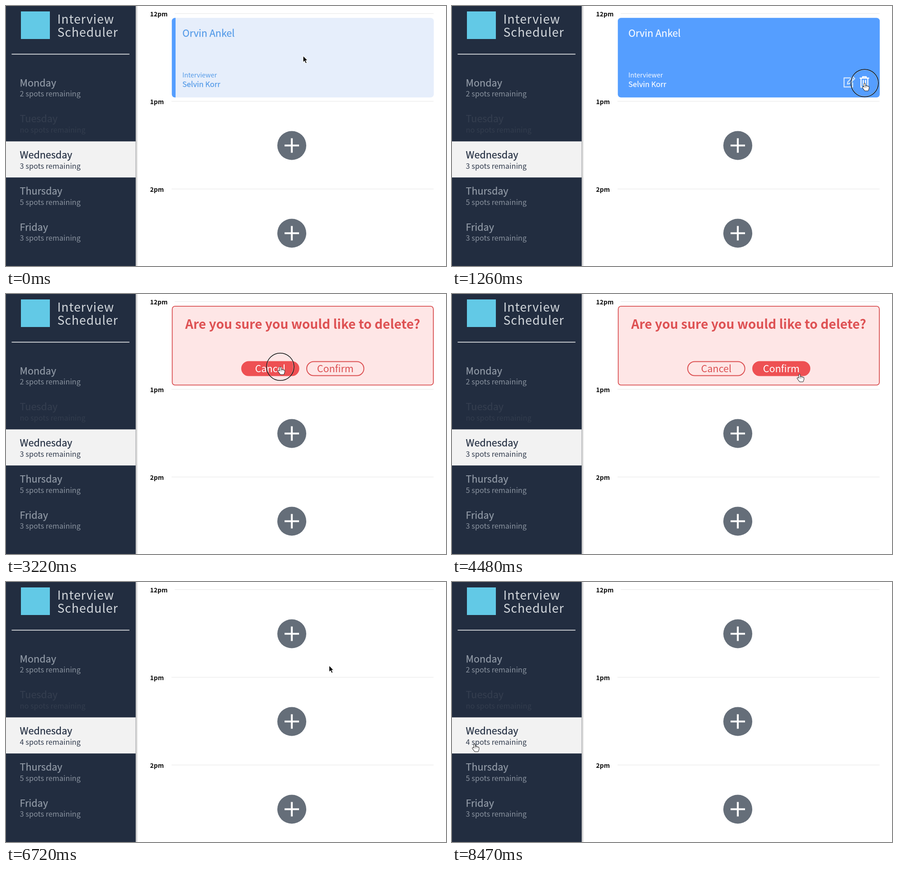
Recreate the animation shown at these times as an HTML page. Size 973 px wide and 575 px high, loop 8.54 s.

```html
<!DOCTYPE html>
<html lang="en">
<head>
<meta charset="utf-8">
<title>Interview Scheduler</title>
<style>
  html, body { margin: 0; width: 100%; height: 100%; overflow: hidden; background: #fff; }
  svg { display: block; width: 100vw; height: 100vh; }
  text { font-family: "Noto Sans CJK JP", "Noto Sans CJK SC", "Noto Sans", sans-serif; font-size: 21.5px; fill: currentColor; }
  .medium { stroke: currentColor; stroke-width: .25; }
  .logo { font-size: 26.6px; font-weight: 300; letter-spacing: 1px; color: #d3d8dd; }
  .spots { font-size: 16.25px; font-weight: 300; opacity: .92; }
  .hour { font-size: 13.9px; font-weight: 700; color: #0b0b0b; }
  .label { font-size: 14.3px; font-weight: 300; }
  .person { font-size: 16.5px; }
  .headline { font-size: 28.1px; font-weight: 700; }
  .mid { text-anchor: middle; }
  .rule { stroke: #ebebeb; stroke-width: 1.3; }
  .open { color: #929ba7; }
  .full { color: #343e4f; }
  .current { color: #222d40; }
  .icon { fill: none; stroke: #fff; stroke-width: 2.4; stroke-linejoin: round; stroke-linecap: round; }
  .pill { fill: none; stroke: #dc5153; stroke-width: 2; color: #dc5153; }
  .pill text { stroke: none; fill: currentColor; }
  .pill.hot { fill: #ee5053; stroke: #ee5053; color: #fff; }
  .hand { stroke-linecap: round; stroke-linejoin: round; }
</style>
</head>
<body>
<svg viewBox="0 0 973 575" preserveAspectRatio="none">
  <defs>
    <linearGradient id="shade">
      <stop offset="0" stop-color="#000" stop-opacity=".3"/>
      <stop offset="1" stop-color="#000" stop-opacity="0"/>
    </linearGradient>
    <g id="add">
      <circle r="32" fill="#656e79"/>
      <path d="M-16 0H16M0 -16V16" stroke="#fff" stroke-width="4.2"/>
    </g>
    <rect id="card" x="366.7" y="26.3" width="579.2" height="176" rx="7"/>
    <clipPath id="cardEdge"><use href="#card"/></clipPath>
    <g id="booking">
      <text class="medium" x="390" y="68">Orvin Ankel</text>
      <text class="label" x="390" y="158">Interviewer</text>
      <text class="person medium" x="390" y="179">Selvin Korr</text>
    </g>
    <path id="fingers" d="M0 2V10M3 7V12M5.7 7.7V12M8.2 8.7V12M-3.5 9.5L1 15.5H7L8.2 11"/>
  </defs>

  <rect x="286" width="6" height="575" fill="url(#shade)"/>
  <rect width="286.7" height="575" fill="#222d40"/>
  <rect x="33" y="12" width="64" height="61" fill="#62c9e6"/>
  <text class="logo" x="113.5" y="39.3">Interview</text>
  <text class="logo" x="113.5" y="68.3">Scheduler</text>
  <path d="M12.5 106.5H273" stroke="#fff" stroke-width="1.7"/>
  <rect y="299.4" width="286.7" height="79.8" fill="#f2f2f2"/>
  <g id="days"></g>
  <g id="hours"></g>

  <g id="empty"><use href="#add" x="632" y="114.5"/></g>

  <g id="idle" color="#559be8">
    <use href="#card" fill="#e6eefb"/>
    <rect x="366" y="26" width="9" height="177" fill="#559eff" clip-path="url(#cardEdge)"/>
    <use href="#booking"/>
  </g>

  <g id="hover" color="#f7faff">
    <use href="#card" fill="#559eff"/>
    <use href="#booking"/>
    <g class="icon" opacity=".72">
      <path d="M880 159H867V179H886V170"/>
      <path d="M874.5 172.5L875.5 167.5L886.5 156.5L890.5 160.5L879.5 171.5ZM883.5 159.5L887.5 163.5"/>
    </g>
    <path id="trash" class="icon" d="M902.5 159.5H921.5M908 159V156.5H916V159M904.5 160V179.5H919.5V160M909.5 164.5V175M914.5 164.5V175"/>
  </g>

  <g id="confirming">
    <rect x="367.6" y="27.2" width="577.4" height="174.2" rx="6" fill="#fee6e6" stroke="#d95052" stroke-width="1.8"/>
    <text class="headline mid" x="656" y="77" color="#de5153">Are you sure you would like to delete?</text>
    <g id="cancel" class="pill mid" transform="translate(584.4 165)">
      <rect x="-63.2" y="-15.5" width="126.4" height="31" rx="15.5"/>
      <text y="8.3">Cancel</text>
    </g>
    <g id="confirm" class="pill mid" transform="translate(728.2 165)">
      <rect x="-63.2" y="-15.5" width="126.4" height="31" rx="15.5"/>
      <text y="8.3">Confirm</text>
    </g>
  </g>

  <g id="deleting">
    <use href="#card" fill="#222d40"/>
    <g transform="translate(583 114.5)" fill="none" stroke="#fff" stroke-width="4">
      <circle r="22.4" stroke-opacity=".17"/>
      <circle id="spinner" r="22.4" pathLength="360" stroke-dasharray="96 264"/>
    </g>
    <text class="headline mid" x="696.7" y="125.3" color="#fff">Deleting</text>
  </g>

  <g id="cursor">
    <g id="ring" fill="none">
      <circle r="29.4" stroke="#fff" stroke-opacity=".6"/>
      <circle r="30.3" stroke="#111" stroke-width="1.5"/>
    </g>
    <path id="arrow" d="M0 0V14.6L3.3 11.6L5.6 17L8.3 15.8L6 10.6H10.3Z" stroke="#fff" stroke-width="1.1"/>
    <g id="hand" class="hand">
      <use href="#fingers" fill="#222" stroke="#222" stroke-width="4.3"/>
      <use href="#fingers" fill="#fff" stroke="#fff" stroke-width="2.3"/>
    </g>
  </g>
</svg>
<script>
const LOOP = 8540;
const $ = id => document.getElementById(id);
const show = (id, on) => $(id).style.display = on ? "" : "none";

const days = [
  ["Monday", "2", "open"],
  ["Tuesday", "no", "full"],
  ["Wednesday", "3", "current"],
  ["Thursday", "5", "open"],
  ["Friday", "3", "open"],
];
$("days").innerHTML = days.map(([day, count, state], i) => `
  <g class="${state}" transform="translate(30.6 ${177.6 + i * 79.8})">
    <text class="medium">${day}</text>
    <text class="spots" y="22.5"><tspan>${count}</tspan> spots remaining</text>
  </g>`).join("");
const count = document.querySelector(".current tspan");

$("hours").innerHTML = ["12pm", "1pm", "2pm"].map((hour, i) => `
  <g transform="translate(0 ${i * 194})">
    <text class="hour" x="318.6" y="22.6">${hour}</text>
    <path class="rule" d="M${i ? 366 : 373} 16.7H945.5"/>
    ${i ? '<use href="#add" x="632" y="114.5"/>' : ""}
  </g>`).join("");

const start = [657, 110];
const trashSpot = [912.5, 170.5];
const countSpot = [41, 348.5];

// Each move: start and end time, destination, downward bow of the path.
const moves = [
  [70, 910, trashSpot],
  [1610, 2240, [740, 162]],
  [2800, 3150, [606.5, 161]],
  [3360, 3780, trashSpot],
  [3990, 4480, [768.5, 177]],
  [4480, 4690, [731, 169]],
  [6650, 7420, countSpot, 150],
  [8260, 8470, [50, 358]],
];
const clicks = { open: 1260, cancel: 3220, reopen: 3850, confirm: 4970 };
const DELAY = 140;
const DELETE_START = 5250, DELETE_END = 6440;

const progress = (t, from, to) => Math.min(1, Math.max(0, (t - from) / (to - from)));
const ease = p => p * p * (3 - 2 * p);

function cursorAt(t) {
  let [x, y] = start;
  for (const [from, to, [toX, toY], bow = 0] of moves) {
    const p = ease(progress(t, from, to));
    x += (toX - x) * p;
    y += (toY - y) * p + bow * Math.sin(Math.PI * p);
  }
  // One small circle around the changed count.
  const angle = 2 * Math.PI * progress(t, 7560, 8120);
  return [x + 25 * Math.sin(angle), y + 11 * (1 - Math.cos(angle))];
}

function phaseAt(t) {
  if (t >= DELETE_END) return "empty";
  if (t >= DELETE_START) return "deleting";
  if (t >= clicks.reopen + DELAY) return "confirming";
  if (t >= clicks.cancel + DELAY) return "hover";
  if (t >= clicks.open + DELAY) return "confirming";
  return t < DELAY ? "idle" : "hover";
}

function draw(now) {
  const t = now % LOOP;
  const [x, y] = cursorAt(t);
  const phase = phaseAt(t);
  const near = (cx, cy, dx, dy) => Math.abs(x - cx) < dx && Math.abs(y - cy) < dy;

  for (const id of ["idle", "hover", "confirming", "deleting", "empty"]) show(id, id === phase);
  const onTrash = phase === "hover" && near(912, 168, 16, 18);
  const onCancel = phase === "confirming" && near(584.4, 165, 64, 16);
  const onConfirm = phase === "confirming" && near(728.2, 165, 64, 16);
  $("trash").style.opacity = onTrash ? 1 : .72;
  $("cancel").classList.toggle("hot", onCancel);
  $("confirm").classList.toggle("hot", onConfirm);
  count.textContent = phase === "empty" ? 4 : 3;

  const pointing = onTrash || onCancel || onConfirm || x < 287;
  show("hand", pointing);
  show("arrow", !pointing);
  show("ring", Object.values(clicks).some(at => t >= at && t < at + 70));
  $("cursor").setAttribute("transform", `translate(${x} ${y})`);
  $("spinner").setAttribute("transform", `rotate(${(t - 5880) / 1100 * 360 - 48})`);
  requestAnimationFrame(draw);
}

draw(0);
</script>
</body>
</html>
```
